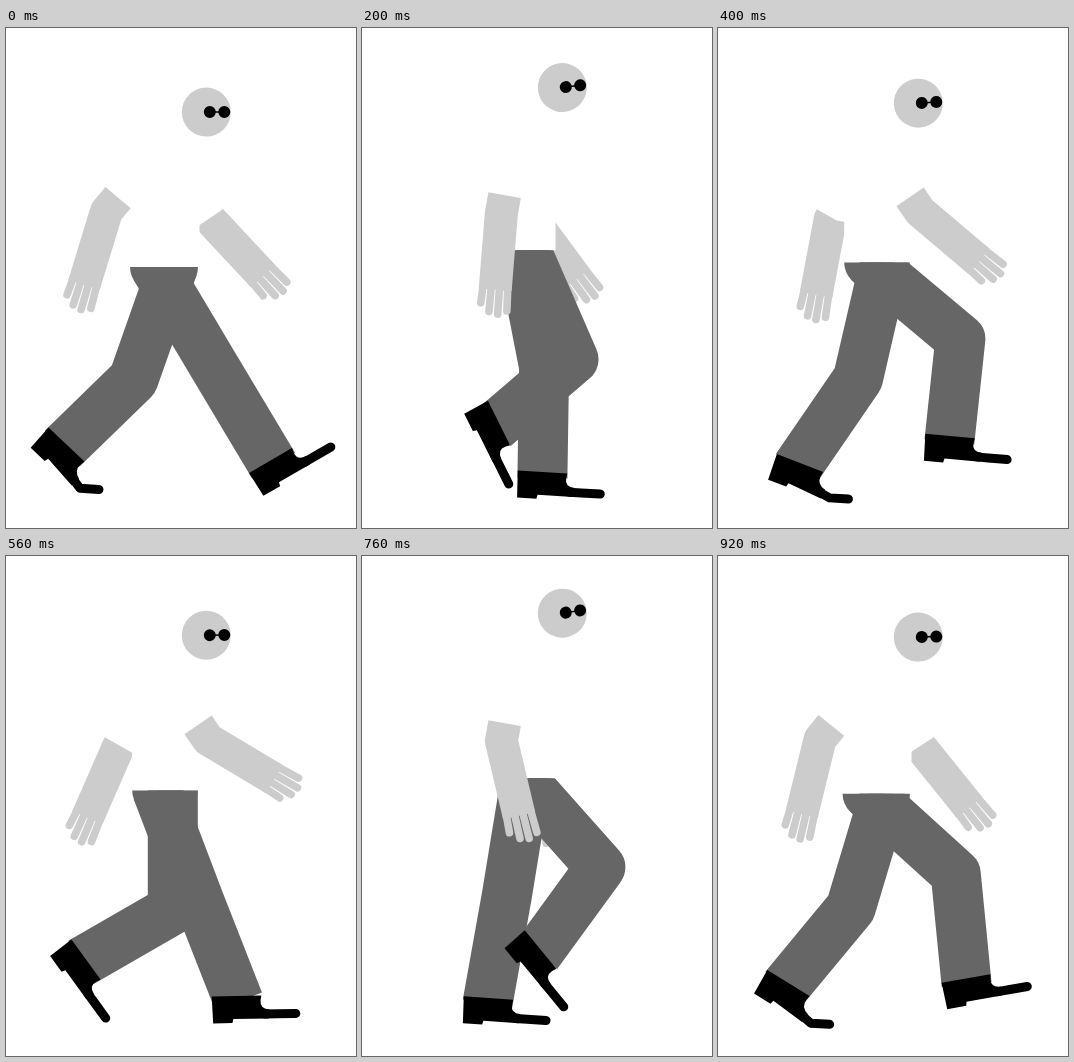
An HTML page with a canvas for the animation above (960 ms loop, 350 by 500 pixels).

```html
<!DOCTYPE html>
<html lang="en">
<head>
<meta charset="utf-8">
<title>Walk cycle</title>
<style>
  html, body { margin: 0; width: 100%; height: 100%; overflow: hidden; background: #fff; }
  canvas { display: block; width: 350px; height: 500px; }
</style>
</head>
<body>
<canvas id="stage"></canvas>
<script>
const LOOP = 960, HALF = LOOP / 2, STEP = 40;
const SKIN = '#ccc', CLOTH = '#666', INK = '#000', PAPER = '#fff';
const RAD = Math.PI / 180;
const THIGH = 119;

// Key poses of one stride: time, thigh angle, ankle x, ankle y, foot angle
const STRIDE = [
  [0, 30.8, 264.5, 432.5, -30],   // heel strike
  [80, 20.8, 230.5, 440, -1],     // foot flat
  [200, 11, 180.5, 444, 3.5],
  [280, -9.3, 126.5, 442, 4],
  [400, -13, 82, 435, 21],        // heel rises
  [480, -19.4, 60.5, 416.5, 43.5],
  [520, -13, 52, 404, 52],        // toe off
  [560, 0, 80, 403.5, 54],
  [680, 23.5, 137, 395, 63.5],    // swing
  [760, 41.6, 178.5, 393.5, 50.5],
  [880, 50, 232, 408, 5],
  [920, 47.8, 248, 422.5, -10]    // kick
];

const NEAR_ARM = { x: 154.5, reach: 84, swing: -40, fore: [18.2, -39.4, -9.3, 4.2], bare: 18 };
const FAR_ARM = { x: 155.5, reach: 88, swing: 34, fore: [12.9, 33, 13, -2.9], bare: 2 };

const stage = document.getElementById('stage');
const g = stage.getContext('2d');
const ratio = window.devicePixelRatio || 1;
stage.width = 350 * ratio;
stage.height = 500 * ratio;

// One swing per stride, and one bounce per step
const swing = t => Math.cos(2 * Math.PI * t / LOOP);
const bounce = t => Math.cos(2 * Math.PI * t / HALF);

// Point at a distance from (x, y); 0 degrees is straight down
const reach = (x, y, angle, d) => [x + Math.sin(angle * RAD) * d, y + Math.cos(angle * RAD) * d];

// Smooth periodic curve through the key poses
function pose(t) {
  const n = STRIDE.length;
  const key = k => STRIDE[(k + n) % n];
  const at = k => key(k)[0] + Math.floor(k / n) * LOOP;
  const i = STRIDE.findLastIndex(k => k[0] <= t);
  const span = at(i + 1) - at(i);
  const u = (t - at(i)) / span;
  return key(i).slice(1).map((a, c) => {
    const v = k => key(k)[c + 1];
    const slope = k => (v(k + 1) - v(k - 1)) / (at(k + 1) - at(k - 1)) * span;
    const b = v(i + 1), p = slope(i), q = slope(i + 1);
    return a + u * (p + u * (3 * (b - a) - 2 * p - q + u * (2 * (a - b) + p + q)));
  });
}

function line(points, width, color, cap) {
  g.beginPath();
  points.forEach(p => g.lineTo(p[0], p[1]));
  g.lineWidth = width;
  g.lineCap = cap;
  g.lineJoin = 'round';
  g.strokeStyle = color;
  g.stroke();
}

function disc(x, y, r, color) {
  g.beginPath();
  g.arc(x, y, r, 0, 2 * Math.PI);
  g.fillStyle = color;
  g.fill();
}

function placed(x, y, angle, draw) {
  g.save();
  g.translate(x, y);
  g.rotate(angle * RAD);
  draw();
  g.restore();
}

function arm(a, t, shoulder) {
  const upper = a.swing * swing(t);
  const [mean, main, lag, twice] = a.fore;
  const fore = mean + main * swing(t) + lag * swing(t - LOOP / 4) + twice * bounce(t);
  const [x, y] = reach(a.x, shoulder, upper, a.reach);
  line([reach(x, y, upper, -a.bare), [x, y], reach(x, y, fore, 77)], 33, SKIN, 'butt');
  placed(x, y, -fore, () => {
    for (let side = -1.5; side < 2; side++) {
      const tip = 101 + 2 * side - 3 * side * side;
      line([[side * 8.2, 72], [side * 8.9, tip]], 7.6, SKIN, 'round');
    }
  });
}

function boot(x, y, angle, bend) {
  const drop = 4 * Math.min(1, bend / 20);
  const ball = [40, 18.5 + drop];
  placed(x, y, angle, () => {
    g.beginPath();
    g.moveTo(-24.8, 0);
    g.lineTo(-23.8, 27);
    g.lineTo(-4.5, 27);
    g.lineTo(-3.5, 23);
    g.lineTo(32, 23 + drop * 0.75);
    g.lineTo(33, 14 + drop * 0.6);
    g.quadraticCurveTo(23, 13.5, 24, 5);
    g.lineTo(24.8, 0);
    g.fillStyle = INK;
    g.fill();
    line([[28, 18.5 + drop * 0.5], ball, reach(...ball, 90 + bend, 19)], 9, INK, 'round');
  });
}

const hipX = t => 160 - 9 * swing(t) - 2 * bounce(t);

function leg(t, belt) {
  const [thigh, ax, ay, foot] = pose(t);
  const hip = hipX(t);
  const knee = reach(hip, belt, thigh, THIGH);
  const shin = Math.atan2(ax - knee[0], ay - knee[1]) / RAD;
  g.save();
  g.beginPath();
  g.rect(0, belt, 350, 500);
  g.clip();
  disc(hip, belt, 25, CLOTH);
  line([[hip, belt], knee, reach(ax, ay, shin, 6)], 50, CLOTH, 'butt');
  g.restore();
  // toes stay flat on the ground until push-off ends
  const grip = Math.max(0, Math.min(1, (560 - t) / 80));
  boot(ax, ay, foot, Math.max(0, foot - 3.5) * grip);
}

function head(x, y, tilt) {
  placed(x, y, tilt, () => {
    disc(0, 0, 24.5, SKIN);
    disc(3.5, 0, 6, INK);
    disc(18, 0, 6, INK);
    line([[3.5, 0], [18, 0]], 1.5, INK, 'butt');
  });
}

function draw(t) {
  const other = (t + HALF) % LOOP;
  const belt = 230 + 9 * bounce(t);
  const shoulder = belt - 120;
  const back = Math.min(hipX(t), hipX(other)) - 25;

  g.setTransform(ratio, 0, 0, ratio, 0, 0);
  g.fillStyle = PAPER;
  g.fillRect(0, 0, 350, 500);

  arm(FAR_ARM, t, shoulder);
  g.fillStyle = PAPER;
  g.fillRect(back, shoulder, 193.5 - back, belt - shoulder);
  leg(other, belt);
  leg(t, belt);
  arm(NEAR_ARM, t, shoulder);
  head(200.3, 70.3 + 14 * bounce(t - 13), 4.4 * bounce(t - 30) - 4.4);
}

const start = performance.now();
function tick() {
  const t = (performance.now() - start) % LOOP;
  draw(Math.floor(t / STEP) * STEP);
  requestAnimationFrame(tick);
}
tick();
</script>
</body>
</html>
```
